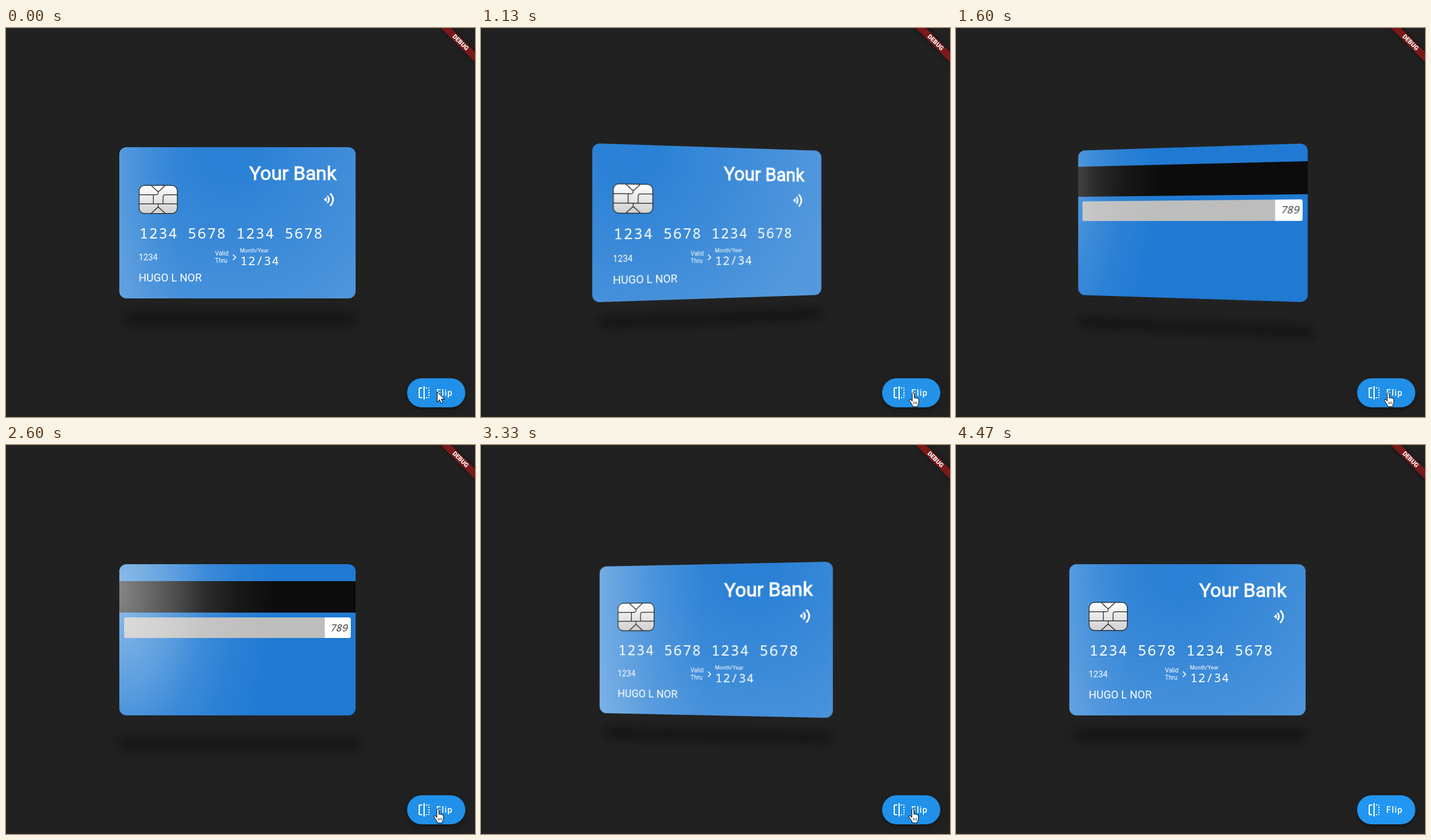
Animation of 774x643 px, one loop 4940 ms. Source, as an HTML page:

```html
<!DOCTYPE html>
<html lang="en">
<head>
<meta charset="utf-8">
<title>Card flip</title>
<style>
  html, body { margin: 0; width: 100%; height: 100%; overflow: hidden; background: #212121; }
  #stage { position: relative; width: 774px; height: 643px; overflow: hidden; font-family: Roboto, sans-serif; }
  #stage div, svg { position: absolute; }
  .face, svg { left: 0; top: 0; width: 774px; height: 643px; }
  .face { transform-origin: 382px 321.5px; }
  .shadow { border-radius: 8px; background: #0008; filter: blur(10px); }
  #front .shadow { left: 195px; top: 472px; width: 384px; height: 16px; }
  #back .shadow { left: 184px; top: 486px; width: 404px; height: 16px; }
  .card { left: 187px; top: 196.5px; width: 390px; height: 250px; border-radius: 12px; overflow: hidden; background: #207ad3; }
  .glare { inset: 0; }
  .stripe { top: 28px; width: 390px; height: 52px; background: #0c0c0c; }
  .sign { left: 8px; top: 88px; width: 374px; height: 34px; border-radius: 3px;
    background: linear-gradient(90deg, #bdbdbd 331px, #fff 331px); }
  svg text { fill: #fff; }
  .mono { font-family: "Noto Sans Mono", monospace; font-weight: 500; }
  #fab { left: 662px; top: 579px; width: 96px; height: 48px; border-radius: 24px;
    box-shadow: 0 3px 5px -1px #0003, 0 6px 10px #0002, 0 1px 18px #0002; }
  #ribbon { left: 734px; top: 28px; width: 80px; height: 12px; transform-origin: 40px -28px; transform: rotate(45deg);
    background: #791919; box-shadow: 0 0 6px #0008; color: #fff; font: 900 10.2px/12px Roboto, sans-serif; text-align: center; }
</style>
</head>
<body>
<div id="stage">
  <div id="front" class="face">
    <div class="shadow"></div>
    <div class="card"><div class="glare"></div></div>
    <svg viewBox="0 0 774 643">
      <defs>
        <linearGradient id="metal" x2="0" y2="1"><stop stop-color="#fff"/><stop offset="1" stop-color="#d0d0d0"/></linearGradient>
      </defs>
      <text x="545.5" y="251.3" font-size="32" text-anchor="end" stroke="#fff" stroke-width=".9">Your Bank</text>
      <g stroke="#222" stroke-width="1.2" transform="translate(.2 -.3)">
        <rect x="219.5" y="260.5" width="63" height="46.5" rx="9" fill="url(#metal)"/>
        <path fill="none" d="M240 261l10 9.500h2l10-9.500M251 270.500v2q0 3.500-3.500 3.500H219.500M243 276v15M282.500 276H263q-4 0-4 4v11M219.500 291h63M251 291v5.500M239 307l11-10h2l11 10"/>
      </g>
      <path fill="#fff" d="M524.500 283.500l3.800-3.700q2.400 3.700 0 7.400z"/>
      <path fill="none" stroke="#fff" stroke-width="2.700" d="M530.500 277.500q4.800 6 0 12M535 273.500q9.500 10 0 20.500"/>
      <text class="mono" x="220" y="348" font-size="24" letter-spacing="1.6">1234 5678 1234 5678</text>
      <text x="219" y="384" font-size="14">1234</text>
      <text x="345" y="376" font-size="10">Valid</text>
      <text x="345" y="388" font-size="10">Thru</text>
      <path fill="none" stroke="#fff" stroke-width="1.500" d="M374.500 374.500l4.500 4.500-4.500 4.500"/>
      <text x="386" y="371" font-size="9">Month/Year</text>
      <text class="mono" x="386.500" y="392" font-size="20" letter-spacing="1" style="font-weight:400">12/34</text>
      <text x="219" y="419" font-size="18">HUGO L NOR</text>
    </svg>
  </div>

  <div id="back" class="face">
    <div class="shadow"></div>
    <div class="card">
      <div class="stripe"></div>
      <div class="sign"></div>
      <div class="glare" style="clip-path: path(evenodd, 'M0 0H390V250H0ZM339 88H382V122H339Z')"></div>
    </div>
    <svg viewBox="0 0 774 643">
      <text class="mono" x="534.500" y="307.500" font-size="16" font-style="italic" style="fill:#3a3a3a">789</text>
    </svg>
  </div>

  <div id="fab"></div>
  <svg viewBox="0 0 774 643">
    <path transform="translate(678 591)" fill="#fff" d="M15 21h2v-2h-2v2zm4-12h2V7h-2v2zM3 5v14c0 1.100.9 2 2 2h4v-2H5V5h4V3H5c-1.100 0-2 .9-2 2zm16-2v2h2c0-1.100-.9-2-2-2zm-8 20h2V1h-2v22zm8-6h2v-2h-2v2zM15 5h2V3h-2v2zm4 8h2v-2h-2v2zm0 8c1.100 0 2-.9 2-2h-2v2z"/>
    <text x="710" y="608" font-size="14" font-weight="500" letter-spacing="1.25">Flip</text>
    <g fill="#fff" stroke="#000" stroke-linejoin="round">
      <path id="arrow" d="M0 0v17l4-4 2.600 6 3-1.300-2.600-5.700h5.500z"/>
      <g id="hand">
        <path d="M-1.500 1.500q0-2 1.700-2t1.700 2v7q1-1.200 2.500 0 1.500-.8 2.600.5 2.400-.2 2.400 2.200v4q0 2-1 3.500-.8 1.500-.8 4h-8.500q0-2.500-1.500-4.300l-3.800-5.500q-.8-1.600.8-2.100 1.300-.2 3.900 2.800z"/>
        <path stroke-width=".8" d="M1 14.500v4M3.500 14.500v4M6 14.500v4"/>
      </g>
    </g>
  </svg>
  <div id="ribbon">DEBUG</div>
</div>

<script>
const LOOP = 4940, STEP = 1000 / 15, FLIP = 1000;
const TO_BACK = 881, TO_FRONT = 2700;
const $ = id => document.getElementById(id);
const white = a => `rgba(255,255,255,${a})`;
const clamp = x => Math.min(1, Math.max(0, x));
const bezier = (s, a, b) => 3 * (1 - s) ** 2 * s * a + 3 * (1 - s) * s * s * b + s ** 3;

// Ease in and out with a pull back at both ends.
function easeBack(x) {
  if (x <= 0 || x >= 1) return clamp(x);
  let lo = 0, hi = 1;
  for (let i = 0; i < 30; i++) {
    const mid = (lo + hi) / 2;
    if (bezier(mid, .68, .265) < x) lo = mid; else hi = mid;
  }
  return bezier(lo, -.55, 1.55);
}

// 0 shows the front, 1 the back; the return runs the same curve backwards.
const turn = t => easeBack(t < TO_FRONT ? (t - TO_BACK) / FLIP : 1 - (t - TO_FRONT) / FLIP);

function pose(id, visible, angle, glare) {
  const face = $(id);
  face.style.visibility = visible ? "visible" : "hidden";
  face.style.transform = `perspective(1000px) rotateY(${angle}deg)`;
  face.querySelector(".glare").style.background = glare;
}

function drawCard(v) {
  const edge = Math.max(0, 100 + 1500 * v);
  const shine = Math.min(.3, edge * .0013);
  pose("front", v < .5, -180 * v,
    `linear-gradient(90deg, ${white(shine)}, ${white(shine * .35)} ${edge / 2}px, ${white(0)} ${edge}px),` +
    `radial-gradient(circle at ${180 + 1500 * v}px 10px, ${white(.05)} 40px, ${white(.23)} 350px)`);
  pose("back", v >= .5, 180 - 180 * v,
    `radial-gradient(260px 450px at ${1400 * (1 - v)}px 45px, ${white(.5)}, ${white(.27)} 36%, ` +
    `${white(.13)} 55%, ${white(.05)} 75%, ${white(0)})`);
}

function drawButton(t) {
  const p = clamp((t - (t < 2500 ? 800 : 2600)) / 350);
  const splash = white(.14 * Math.sin(Math.PI * p));
  const r = 10 + 70 * p;
  $("fab").style.background =
    `radial-gradient(circle at 50px 24px, ${splash} ${r}px, transparent ${r + 1}px) ${t < 4395 ? "#2090e9" : "#2196f3"}`;
}

function place(id, x, y, visible) {
  $(id).setAttribute("transform", `translate(${x} ${y})`);
  $(id).style.display = visible ? "" : "none";
}

function drawCursor(t) {
  const leaving = t >= 4395;
  place("arrow", leaving ? 331.5 : 711.5, leaving ? 595 : 601.5, t < 795 || leaving && t < 4460);
  const [x, y] = t < 2595 ? [713.2, 603.2] : t < 3530 ? [712.5, 602] : [728, 611];
  place("hand", x, y, t >= 795 && !leaving);
}

function frame(now) {
  // The motion is sampled fifteen times a second.
  const t = Math.floor((now % LOOP + 4) / STEP) * STEP;
  drawCard(turn(t));
  drawButton(t);
  drawCursor(t);
  requestAnimationFrame(frame);
}
frame(0);
</script>
</body>
</html>
```
